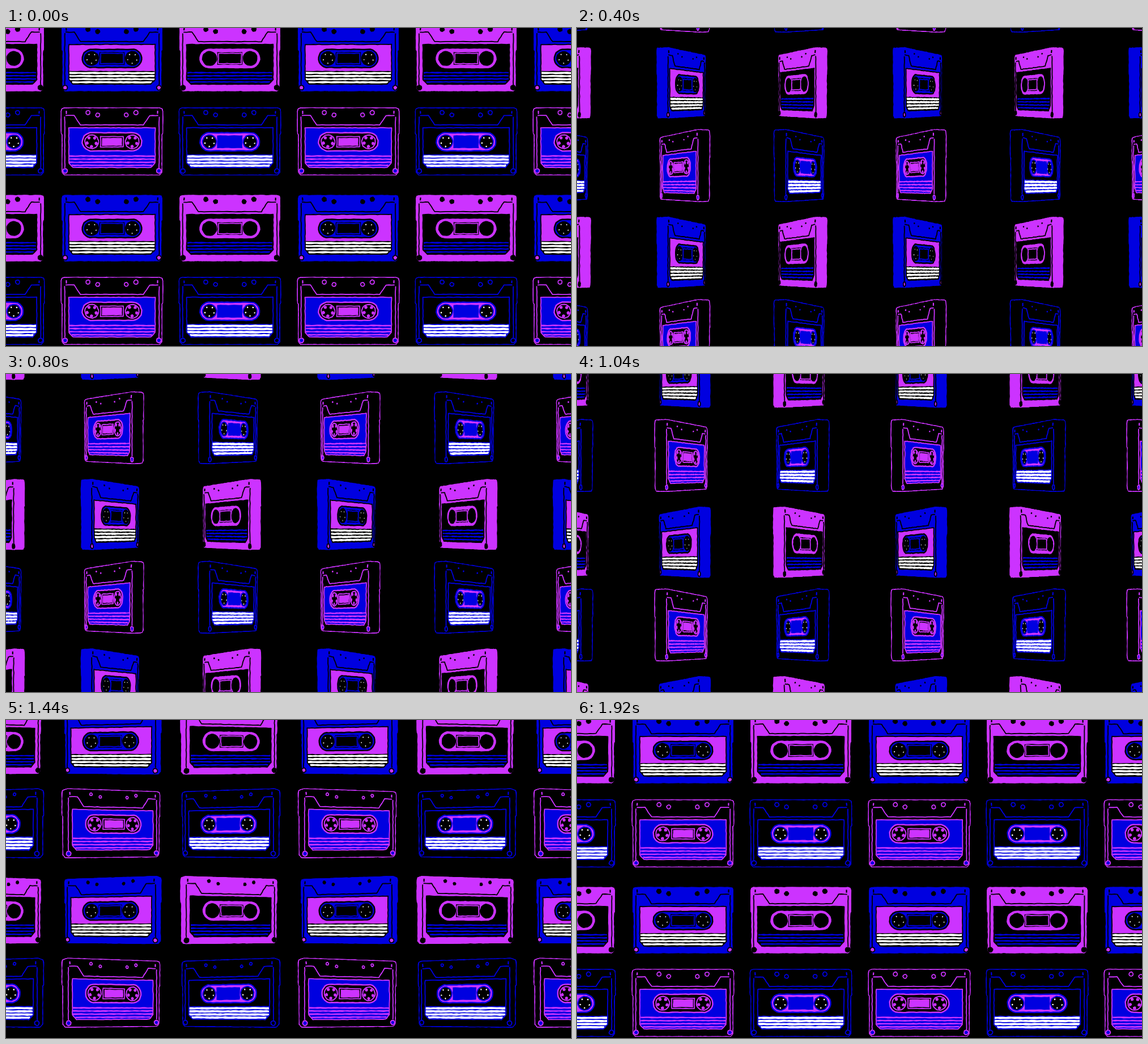
These frames come from a looping animation (997 by 561 pixels, 2 s). An HTML page with a canvas:

```html
<!DOCTYPE html>
<html lang="en">
<head>
<meta charset="utf-8">
<title>Cassettes</title>
<style>
html, body { margin: 0; width: 100%; height: 100%; overflow: hidden; background: #000; }
canvas { display: block; }
</style>
</head>
<body>
<canvas id="stage" width="997" height="561"></canvas>
<script>
const stage = document.getElementById('stage').getContext('2d');
const BLACK = '#000', BLUE = '#0000e0', PINK = '#cc33ff', WHITE = '#fff';
const STEP = 80, FRAMES = 25, PERIOD = 299.4;
const HALF_DEPTH = 9, CAMERA = 1000, HORIZON = 30;

// [frame, value, slope per frame]
const SCROLL = [[0, 0, 0], [3, 10.5, 8.5], [7, 109.5, 37], [13, 245.5, 11.8],
  [16, 272, 6.6], [20, 290.5, 3.2], [24, PERIOD, 1.2]];
const TURN = [[0, 0, 1], [3, 17.5, 13], [7, 144, 41], [13, 295, 13],
  [16, 326.5, 8], [20, 348.5, 4], [24, 360, 1.4]];

const KINDS = [
  { spin: 1, row: 200.5, col: 0, solid: false, body: BLACK, line: PINK, label: BLUE, edge: PINK,
    pod: BLACK, podLine: PINK, hubLine: PINK, tooth: PINK, toothSize: 2.8,
    frame: BLACK, boxLine: PINK, box: PINK,
    stripe: PINK, gap: BLUE, stripeSize: 2.5, screw: BLUE, hole: BLACK },
  { spin: -1, row: 200.5, col: 1, solid: false, body: BLACK, line: BLUE, label: BLACK, edge: BLUE,
    pod: PINK, podLine: BLUE, hubLine: BLUE, tooth: WHITE, toothSize: 1.3,
    frame: BLUE, boxLine: BLUE, box: BLUE,
    stripe: WHITE, gap: BLUE, stripeSize: 3.8, screw: BLACK, hole: BLACK },
  { spin: -1, row: 353.5, col: 0, solid: true, body: BLUE, line: BLACK, label: PINK, edge: BLACK,
    pod: BLUE, podLine: BLACK, hubLine: BLACK, tooth: WHITE, toothSize: 1,
    frame: BLACK, boxLine: BLUE, box: BLACK,
    stripe: WHITE, gap: BLACK, stripeSize: 3.4, screw: PINK, hole: BLACK },
  { spin: 1, row: 353.5, col: 1, solid: true, body: PINK, line: BLACK, label: BLACK, edge: BLACK,
    pod: PINK, podLine: PINK, hubLine: BLACK, tooth: BLACK, toothSize: 1,
    frame: BLACK, boxLine: PINK, box: BLACK,
    stripe: BLUE, gap: BLACK, stripeSize: 2.4, screw: BLACK, hole: BLACK }
];
for (const kind of KINDS) {
  const canvas = document.createElement('canvas');
  canvas.width = 240;
  canvas.height = 160;
  kind.ctx = canvas.getContext('2d');
  kind.ctx.lineJoin = 'round';
}

let ctx, sin, cos, seed;

function random() {
  seed = (seed * 16807) % 2147483647;
  return seed / 2147483647;
}

function ease(keys, f) {
  let i = 0;
  while (i < keys.length - 2 && f > keys[i + 1][0]) i++;
  const [f0, v0, m0] = keys[i], [f1, v1, m1] = keys[i + 1];
  const d = f1 - f0, u = (f - f0) / d, w = 1 - u;
  return v0 * w * w * (1 + 2 * u) + v1 * u * u * (3 - 2 * u) + d * u * w * (m0 * w - m1 * u);
}

function project(x, y, z) {
  const k = CAMERA / (CAMERA - x * sin - z * cos);
  return [(x * cos - z * sin) * k, HORIZON + (y - HORIZON) * k];
}

// Trace a polyline in short, slightly shaky pieces.
function trace(points, closed = true, z = HALF_DEPTH) {
  ctx.beginPath();
  const mark = (x, y) => {
    const [px, py] = project(x, y, z);
    ctx.lineTo(px + random() * 0.8 - 0.4, py + random() * 0.8 - 0.4);
  };
  const count = points.length - (closed ? 0 : 1);
  for (let i = 0; i < count; i++) {
    const [x0, y0] = points[i], [x1, y1] = points[(i + 1) % points.length];
    const n = Math.max(1, Math.ceil(Math.hypot(x1 - x0, y1 - y0) / 5));
    for (let j = 0; j < n; j++) mark(x0 + (x1 - x0) * j / n, y0 + (y1 - y0) * j / n);
  }
  if (closed) ctx.closePath();
  else mark(...points[count]);
}

function fill(color, points, z) {
  trace(points, true, z);
  ctx.fillStyle = color;
  ctx.fill();
}

function stroke(color, width, points, closed, z) {
  trace(points, closed, z);
  ctx.strokeStyle = color;
  ctx.lineWidth = width;
  ctx.stroke();
}

const rect = (x0, y0, x1, y1) => [[x0, y0], [x1, y0], [x1, y1], [x0, y1]];

// A circle, or a stadium when its two halves are pulled apart.
function round(cx, cy, r, pull = 0) {
  const points = [];
  for (let i = 0; i < 24; i++) {
    const a = (i + 0.5) * Math.PI / 12, c = Math.cos(a);
    points.push([cx + r * c + Math.sign(c) * pull, cy + r * Math.sin(a)]);
  }
  return points;
}

const mirror = half => [...half, ...half.map(([x, y]) => [-x, y]).reverse()];
const BODY = mirror([[83, -58.5], [87, -57], [88, -53], [88, -15], [86.5, -13], [86.5, 53], [83, 57]]);
const LABEL = mirror([[75.5, -24.5], [75.5, 37], [68, 45]]);
const STRIPES = mirror([[75, 22], [75, 37], [68, 45]]);
const COLLAR = mirror([[81, -46], [66, -46], [55, -29.5]]);

function drawBody(k) {
  const slices = [];
  for (let i = -4; i <= 4; i++) slices.push(i * HALF_DEPTH / 4);
  if (!k.solid) for (const z of slices) stroke(k.line, 3, BODY, true, z);
  for (const z of slices) fill(k.body, BODY, z);
}

function drawCassette(k) {
  drawBody(k);
  stroke(k.line, 1.8, COLLAR, false);
  const open = 1 - Math.abs(sin); // the holes close up as the side turns away
  for (const s of [-1, 1]) {
    stroke(k.line, 1.8, [[s * 82.5, -44], [s * 82.5, 46]], false);
    stroke(k.line, 2.2, [[s * 80, -54], [s * 80, -49]], false);
    for (const hole of [round(s * 42, -51, 3.6 * open), round(s * 25, -47, 3.4 * open)]) {
      fill(k.hole, hole);
      stroke(k.line, 1.7, hole);
    }
    const screw = round(s * 82, 51, 4);
    fill(k.screw, screw);
    stroke(k.line, 1.8, screw);
  }

  fill(k.label, LABEL);
  fill(k.gap, STRIPES);
  for (let i = 0; i < 4; i++) {
    const y = 23.7 + i * 5.4, w = i < 3 ? 74.5 : 70;
    fill(k.stripe, rect(-w, y, w, y + k.stripeSize));
  }
  stroke(k.edge, 1.8, LABEL);

  const pod = round(0, 0, 16, 36);
  fill(k.pod, pod);
  stroke(k.podLine, 2.4, pod);
  for (const x of [-35.5, 35.5]) {
    const hub = round(x, 0, 12);
    fill(BLACK, hub);
    stroke(k.hubLine, 2, hub);
    for (let i = 0; i < 5; i++) {
      const a = i * Math.PI * 0.4 + 0.35;
      fill(k.tooth, round(x + 8.3 * Math.cos(a), 8.3 * Math.sin(a), k.toothSize));
    }
  }
  fill(k.frame, rect(-22, -11, 22, 11));
  stroke(k.boxLine, 1.8, rect(-20, -9, 20, 9));
  fill(k.box, rect(-17.5, -6.8, 17.5, 6.8));
}

function render(f) {
  const scroll = ease(SCROLL, f), turn = ease(TURN, f) * Math.PI / 180;
  stage.fillStyle = BLACK;
  stage.fillRect(0, 0, 997, 561);
  // Both sides look alike, so always show the one that faces the viewer.
  const flip = Math.cos(turn) < 0 ? -1 : 1;
  cos = Math.cos(turn) * flip;
  KINDS.forEach((kind, i) => {
    ctx = kind.ctx;
    seed = 1000 + f * 97 + i * 13;
    sin = Math.sin(turn) * flip * kind.spin;
    ctx.setTransform(1, 0, 0, 1, 0, 0);
    ctx.clearRect(0, 0, 240, 160);
    ctx.translate(120, 80);
    drawCassette(kind);
    for (let y = kind.row + scroll - 3 * PERIOD; y < 650; y += PERIOD) {
      for (let x = 186.8 + kind.col * 208.2 - 416.7; x < 1120; x += 416.7) {
        stage.drawImage(ctx.canvas, Math.round(x - 120), Math.round(y - 80));
      }
    }
  });
}

let shown = -1;
function tick() {
  const f = Math.floor(performance.now() / STEP) % FRAMES;
  if (f !== shown) render(shown = f);
  requestAnimationFrame(tick);
}
tick();
</script>
</body>
</html>
```
